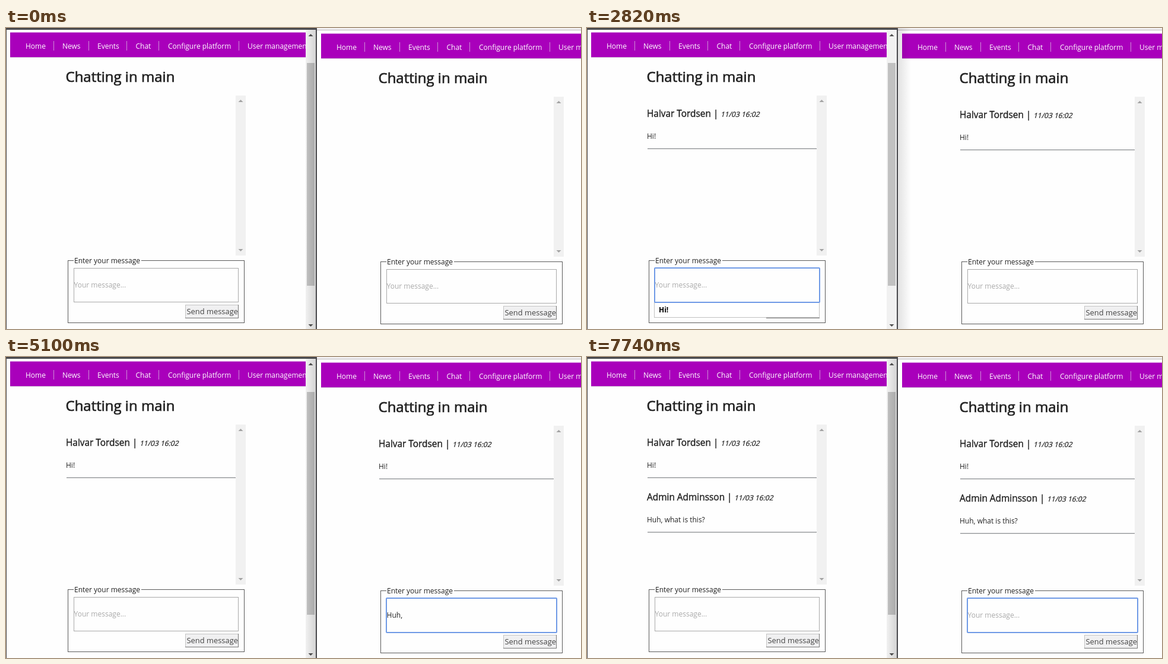
Animation of 969 by 508 pixels, one loop 8000 ms. Source, as an HTML page:

```html
<!DOCTYPE html>
<html lang="en">
<head>
<meta charset="utf-8">
<title>Chat in two windows</title>
<style>
  html, body { margin: 0; width: 100%; height: 100%; overflow: hidden; background: #fefefe; }
  svg { display: block; width: 100%; height: 100%; }
  text { font: 12px "Open Sans", sans-serif; fill: #222; white-space: pre; }
  .nav { fill: #fff; }
  .title { font-size: 24px; stroke: #222; stroke-width: .7px; }
  .name { font-size: 15.4px; stroke: #222; stroke-width: .4px; }
  .date { stroke: #222; stroke-width: .25px; }
  .hint { fill: #a9a9a9; }
  .button { font-size: 12.9px; fill: #444; }
  .pick { font-weight: 700; fill: #000; }
</style>
</head>
<body>
<svg id="stage" viewBox="0 0 969 508" preserveAspectRatio="none"></svg>
<script>
const LOOP = 8000;
const stage = document.getElementById('stage');

const rect = (x, y, w, h, fill, more = '') =>
  `<rect x="${x}" y="${y}" width="${w}" height="${h}" fill="${fill}" ${more}/>`;
const frame = (x, y, w, h, color, fill = 'none') =>
  rect(x + .5, y + .5, w - 1, h - 1, fill, `stroke="${color}"`);
const label = (x, y, cls, str, more = '') =>
  `<text x="${x}" y="${y}" class="${cls}" ${more}>${str}</text>`;
const arrow = (x, y, dir, color) =>
  `<path d="M${x - 4} ${y + 2 * dir}h8l-4 ${-4 * dir}z" fill="${color}"/>`;

const menu = [['Home', 33], ['News', 95], ['Events', 154], ['Chat', 218.5],
  ['Configure platform', 273], ['User management', 407]];
const dividers = [80, 139, 203, 257, 392];

function navBar(width) {
  return rect(7, 7.5, width, 42, '#a900bb') +
    rect(7, 49, width, 1, '#c9a3cf') +
    dividers.map(x => rect(x, 22, 1, 16, '#cf8fd8')).join('') +
    menu.map(([str, x]) => label(x, 35, 'nav', str)).join('');
}

function post(id, y, name, barX, dateX, body, wide) {
  return `<g id="${id}">` +
    label(101, y, 'name', name) +
    label(barX, y, 'name', '|') +
    label(0, 0, 'date', '11/03 16:02', `transform="translate(${dateX} ${y}) skewX(-14)"`) +
    label(101, y + 37, '', body) +
    rect(102, y + 53, 285 + wide, 1, '#8d9094') +
    rect(102, y + 54, 285 + wide, 1, '#dcdcdc') + '</g>';
}

// wide: how much wider the content column is than in the left window
function chat(id, wide) {
  const sx = 387 + wide, bx = 302 + wide;
  return label(100.5, 91, 'title', 'Chatting in main') +
    rect(sx, 114, 17, 270, '#f1f1f1') +
    arrow(sx + 8.5, 123, 1, '#a3a3a3') + arrow(sx + 8.5, 375, -1, '#a3a3a3') +
    post(id + 'Post1', 150, 'Halvar Tordsen', 213, 225, 'Hi!', wide) +
    post(id + 'Post2', 242, 'Admin Adminsson', 236, 248, 'Huh, what is this?', wide) +
    frame(104, 392, 298 + wide, 106, '#5a5a5a') +
    rect(114, 391, 114, 3, '#fefefe') +
    label(115, 397, '', 'Enter your message') +
    rect(bx, 467, 90, 23, '#f0f0f1') +
    rect(bx, 467, 90, 1, '#c4c4c4') + rect(bx, 467, 1, 23, '#c4c4c4') +
    rect(bx, 489, 90, 1, '#777') + rect(bx + 89, 467, 1, 23, '#777') +
    label(bx + 2.5, 483, 'button', 'Send message') +
    frame(114, 405, 278 + wide, 58, '#a9a9a9') +
    `<g id="${id}List">` + frame(113, 463, 279 + wide, 26, '#c0c0c0', '#fff') +
    label(121, 480, 'pick', 'Hi!') + '</g>' +
    `<g id="${id}Ring">` + rect(114, 405, 278 + wide, 58, 'none',
      'rx="1" stroke="#6f9ae6" stroke-width="2"') + '</g>' +
    label(114.6, 438, 'hint', 'Your message...', `id="${id}Hint"`) +
    label(114.6, 438, '', '', `id="${id}Text"`) +
    rect(115, 425, 1, 17, '#000', `id="${id}Caret"`);
}

const fade = (id, from, to) =>
  `<linearGradient id="${id}"><stop offset="0" stop-opacity="${from}"/>` +
  `<stop offset="1" stop-opacity="${to}"/></linearGradient>`;

stage.innerHTML =
  `<defs>${fade('toRight', .11, 0)}${fade('toLeft', 0, .13)}` +
  `<clipPath id="page"><rect width="505" height="508"/></clipPath></defs>` +
  rect(0, 0, 969, 508, '#fefefe') +
  `<g clip-path="url(#page)">${navBar(510)}</g>` +
  chat('l', 0) +
  rect(505, 3, 17, 505, '#f1f1f1') + rect(507, 59, 13, 376, '#c1c1c1') +
  arrow(513.5, 12, 1, '#505050') + arrow(513.5, 502, -1, '#505050') +
  rect(505, 0, 18, 508, 'url(#toLeft)', 'id="shadeLeft"') +
  rect(0, 0, 523, 3, '#48484c') + rect(0, 0, 1, 508, '#48484c') +
  rect(522, 0, 2, 508, '#48484c') +
  rect(524, 0, 445, 3, '#f3f1f3') + rect(524, 3, 445, 1, '#bdb8bd') +
  `<g transform="translate(524 2)">${navBar(440)}</g>` +
  `<g transform="translate(527 2)">${chat('r', 9)}</g>` +
  rect(524, 0, 22, 508, 'url(#toRight)', 'id="shadeRight"');

const el = {};
stage.querySelectorAll('[id]').forEach(node => el[node.id] = node);
const show = (id, on) => el[id].setAttribute('visibility', on ? 'visible' : 'hidden');

const fields = {
  l: { words: 'Hi!', keys: [1560, 1740, 1980], focus: 900, sent: 2340, blur: 3180,
       list: [1560, 3180] },
  r: { words: 'Huh, what is this?',
       keys: [3840, 3960, 4080, 4500, 4620, 5280, 5460, 5580, 5640, 5760,
              6000, 6060, 6120, 6420, 6540, 6600, 6720, 6960],
       focus: 3180, sent: 7200, blur: LOOP, list: [3840, 3960] }
};
const caretOff = [1380, 2820, 3720, 5100, 7740];

function drawField(id, f, t) {
  const focused = t >= f.focus && t < f.blur;
  const typed = t < f.sent ? f.words.slice(0, f.keys.filter(k => k <= t).length) : '';
  const last = Math.max(...[f.focus, ...f.keys, f.sent].filter(k => k <= t));
  const off = caretOff.some(b => b > last && b <= t);
  el[id + 'Text'].textContent = typed;
  const width = typed ? el[id + 'Text'].getComputedTextLength() : 0;
  el[id + 'Caret'].setAttribute('x', 115 + Math.round(width));
  show(id + 'Hint', !typed);
  show(id + 'Caret', focused && !off);
  show(id + 'Ring', focused);
  show(id + 'List', t >= f.list[0] && t < f.list[1]);
  show(id + 'Post1', t >= 2340);
  show(id + 'Post2', t >= 7260);
}

function draw(t) {
  const leftActive = t >= 840 && t < 3180;
  show('shadeRight', leftActive);
  show('shadeLeft', !leftActive);
  for (const id in fields) drawField(id, fields[id], t);
}

const start = performance.now();
function tick() {
  draw((performance.now() - start) % LOOP);
  requestAnimationFrame(tick);
}
tick();
</script>
</body>
</html>
```
